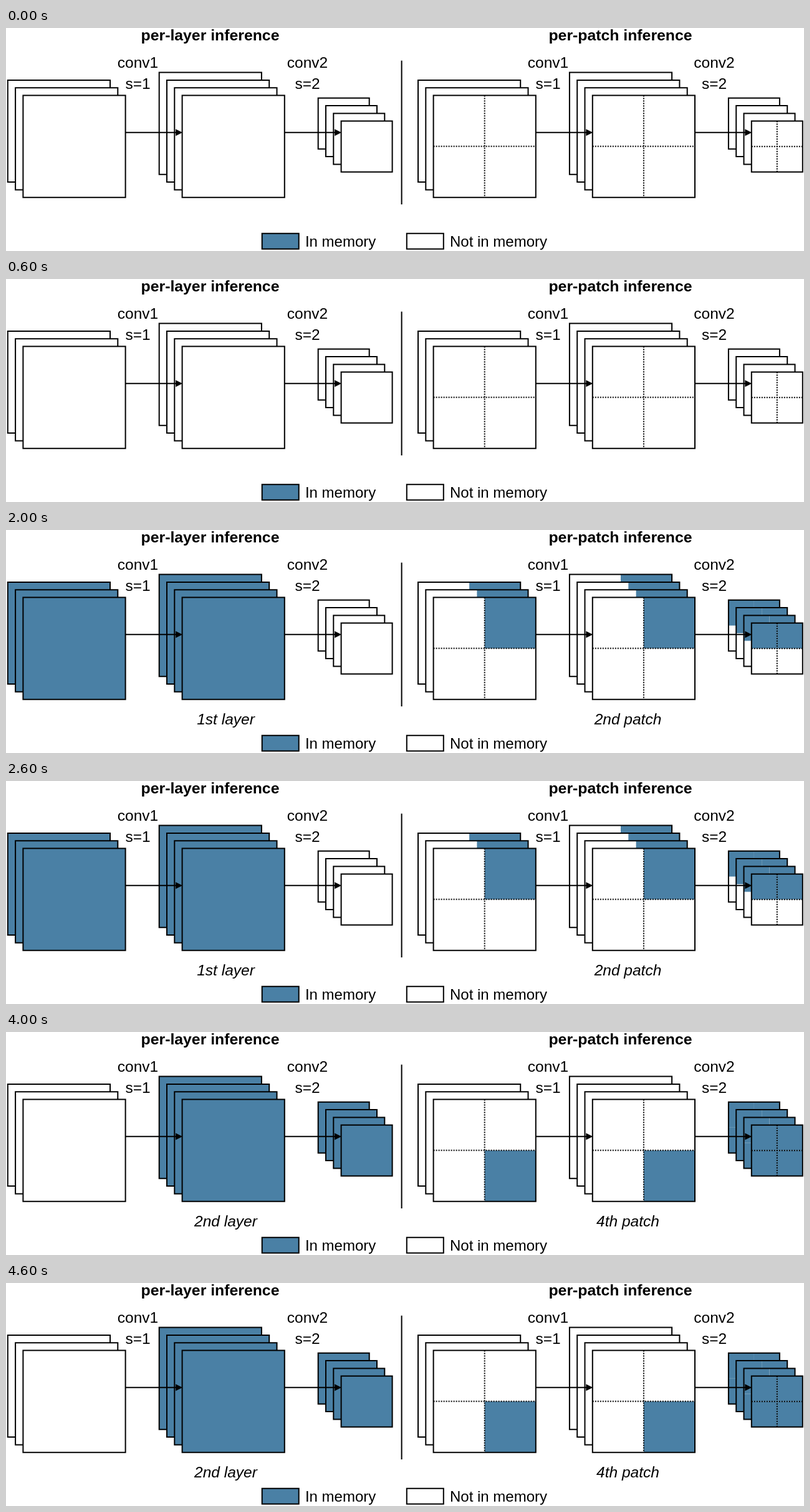
An HTML page that plays this animation: 1280x359 px, repeating every 5000 ms.

```html
<!DOCTYPE html>
<html lang="en">
<head>
<meta charset="utf-8">
<title>Per-layer and per-patch inference</title>
<style>
html, body { margin: 0; width: 100%; height: 100%; overflow: hidden; background: #fff; }
svg { display: block; width: 100%; height: 100%; }
text { font: 24.5px "Liberation Sans", Arial, sans-serif; fill: #000; text-anchor: middle; }
.title { font-weight: bold; font-size: 24.8px; }
.note { font-style: italic; }
.key { text-anchor: start; font-size: 24px; }
.line { fill: none; stroke: #000; stroke-width: 2; }
.dots { stroke-dasharray: 2 2; }
</style>
</head>
<body>
<svg id="stage" viewBox="0 0 1280 359"></svg>
<script>
const BLUE = '#4a80a5';
const STEP = 12.3, PERIOD = 5000;
const stage = document.getElementById('stage');

// Front square of each stack: x, y, size, number of layers
const stacks = [[27.4, 108.5, 164.2, 3], [282.6, 108.5, 164.2, 4], [537.6, 149.7, 82, 4]];
const SHIFT = 658.2;

function add(tag, attrs, text) {
  const el = document.createElementNS('http://www.w3.org/2000/svg', tag);
  for (const k in attrs) el.setAttribute(k, attrs[k]);
  if (text) el.textContent = text;
  stage.appendChild(el);
  return el;
}

const label = (x, y, s, cls = '') => add('text', { x, y, class: cls }, s);
const path = (d, cls = 'line') => add('path', { d, class: cls });
const rect = (x, y, width, height, fill) => add('rect', { x, y, width, height, fill });

// Returns the four quarters of every layer, grouped by quarter
function stack([x, y, size, count], split) {
  const quarters = [[], [], [], []];
  const h = size / 2;
  for (let i = count - 1; i >= 0; i--) {
    const lx = x - i * STEP, ly = y - i * STEP;
    rect(lx, ly, size, size, '#fff');
    if (split) {
      quarters.forEach((q, n) => q.push(rect(lx + n % 2 * h, ly + (n >> 1) * h, h, h, 'none')));
    } else {
      quarters[0].push(rect(lx, ly, size, size, 'none'));
    }
    path(`M${lx} ${ly}h${size}v${size}h${-size}z`);
  }
  if (split) {
    path(`M${x} ${y + h}h${size}`, 'line dots');
    path(`M${x + h} ${y}v${size}`, 'line dots');
  }
  return quarters;
}

function arrow(x1, x2) {
  path(`M${x1} 168.3H${x2 - 9}`);
  path(`M${x2 + 0.5} 168.3l-11 -5.5v11z`, '');
}

function panel(dx, split) {
  const placed = stacks.map(([x, ...rest]) => [x + dx, ...rest]);
  const parts = placed.map(s => stack(s, split));
  for (let i = 0; i < 2; i++) {
    arrow(placed[i][0] + placed[i][2], placed[i + 1][0]);
  }
  return parts;
}

const layers = panel(0, false);
const patches = panel(SHIFT, true);

path('M634.6 52.5V284');
label(327.5, 20, 'per-layer inference', 'title');
label(985.5, 20, 'per-patch inference', 'title');
[[211.5, 1], [483.5, 2], [869.5, 1], [1136, 2]].forEach(([x, n]) => {
  label(x, 63.5, 'conv' + n);
  label(x, 97.5, 's=' + n);
});
const layerNote = label(352.5, 312.5, '', 'note');
const patchNote = label(997.5, 312.5, '', 'note');

[[410.7, BLUE, 'In memory'], [642.8, '#fff', 'Not in memory']].forEach(([x, fill, s]) => {
  rect(x, 330.7, 59, 25, fill);
  path(`M${x} 330.7h59v25h-59z`);
  label(x + 69.2, 352, s, 'key');
});

const paint = (els, on) => els.forEach(el => el.setAttribute('fill', on ? BLUE : 'none'));
const ordinal = n => n ? n + ['st', 'nd', 'rd', 'th'][n - 1] : '';

function draw(step) {
  const layer = Math.ceil(step / 2);
  layers.forEach((q, i) => paint(q[0], layer && (i === layer - 1 || i === layer)));
  patches.forEach((q, i) => q.forEach((els, n) => {
    paint(els, i === 2 ? n < step : n === step - 1);
  }));
  layerNote.textContent = layer ? ordinal(layer) + ' layer' : '';
  patchNote.textContent = step ? ordinal(step) + ' patch' : '';
}

const start = performance.now();
let shown = -1;
function tick() {
  const t = (performance.now() - start) % PERIOD;
  const step = Math.floor(t / 1000);
  if (step !== shown) draw(shown = step);
  requestAnimationFrame(tick);
}
tick();
</script>
</body>
</html>
```
